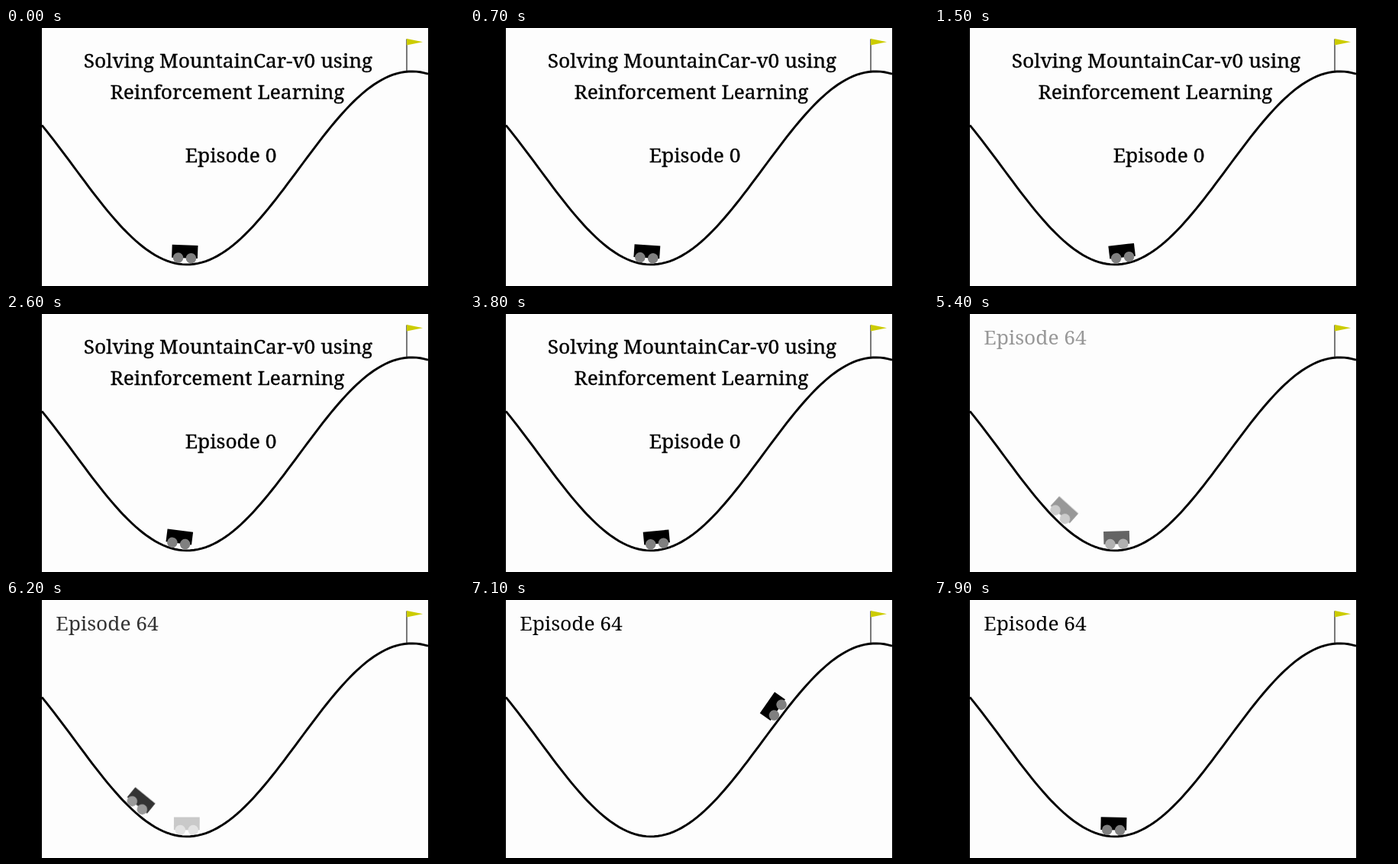
An HTML page for the animation above (8000 ms loop, 600 px wide and 338 px high).

```html
<!DOCTYPE html>
<html lang="en">
<head>
<meta charset="utf-8">
<title>Mountain car</title>
<style>
  html, body { margin: 0; width: 100%; height: 100%; overflow: hidden; background: #fdfdfd; }
  svg { display: block; width: 600px; height: 338px; }
  text { font: 26.3px "Noto Serif", serif; text-anchor: middle; }
  #title { stroke: #000; stroke-width: .35; }
  .wheel { fill: #808080; }
</style>
</head>
<body>
<svg viewBox="0 0 600 338">
  <defs>
    <g id="car">
      <rect x="-16.9" y="-25.35" width="33.8" height="16.9"/>
      <circle class="wheel" cx="-8.45" cy="-8.45" r="6.76"/>
      <circle class="wheel" cx="8.45" cy="-8.45" r="6.76"/>
    </g>
  </defs>
  <polyline id="track" fill="none" stroke="#000" stroke-width="2.9"/>
  <g id="first"><use href="#car"/></g>
  <g id="second">
    <use href="#car"/>
    <text x="132.5" y="40">Episode 64</text>
  </g>
  <path d="M525 56.6V14.4" stroke="#222" stroke-width="1.2"/>
  <path d="M525 14V22.6L546 18.3z" fill="#cccc00"/>
  <g id="title">
    <text x="291" y="52">Solving MountainCar-v0 using</text>
    <text x="290" y="93">Reinforcement Learning</text>
    <text x="294.5" y="175.5">Episode 0</text>
  </g>
  <path d="M0 0H47V338H0zM553 0H600V338H553z"/>
</svg>
<script>
  const LOOP = 8000, STEP = 100, SCALE = 506 / 1.8;
  const $ = id => document.getElementById(id);
  const clamp = v => Math.max(0, Math.min(1, v));

  // World position on the hill to stage pixels
  const stageX = p => 47 + (p + 1.2) * SCALE;
  const stageY = p => 338 - (Math.sin(3 * p) * .45 + .55) * SCALE;

  // Turning points of each car: [ms, world position]
  const idle = [
    [-500, -.518], [500, -.554], [1450, -.484], [2400, -.574],
    [3480, -.481], [4700, -.553], [5700, -.505], [6700, -.545]
  ];
  const swing = [[4600, -.42], [5840, -.947], [7200, .106], [8580, -1.14]];

  // Half a cosine wave from each turning point to the next
  function swingAt(turns, t) {
    t = Math.max(turns[0][0], Math.min(turns.at(-1)[0], t));
    const i = turns.findIndex(turn => turn[0] >= t) || 1;
    const [t0, p0] = turns[i - 1], [t1, p1] = turns[i];
    return p0 + (p1 - p0) * (1 - Math.cos(Math.PI * (t - t0) / (t1 - t0))) / 2;
  }

  function place(group, p) {
    const angle = -Math.cos(3 * p) * 180 / Math.PI;
    group.querySelector("use").setAttribute("transform",
      `translate(${stageX(p)} ${stageY(p)}) rotate(${angle})`);
  }

  $("track").setAttribute("points", Array.from({ length: 100 }, (_, i) => {
    const p = -1.2 + 1.8 * i / 99;
    return `${stageX(p)},${stageY(p)}`;
  }).join(" "));

  function draw(now) {
    const t = Math.floor(now % LOOP / STEP) * STEP;
    const mix = clamp((t - 4600) / 2000);
    place($("first"), swingAt(idle, t));
    place($("second"), swingAt(swing, t));
    $("first").style.opacity = 1 - mix;
    $("second").style.opacity = mix;
    $("title").style.opacity = 1 - clamp((t - 4600) / 500);
  }

  const start = performance.now();
  function tick() {
    draw(performance.now() - start);
    requestAnimationFrame(tick);
  }
  tick();
</script>
</body>
</html>
```
